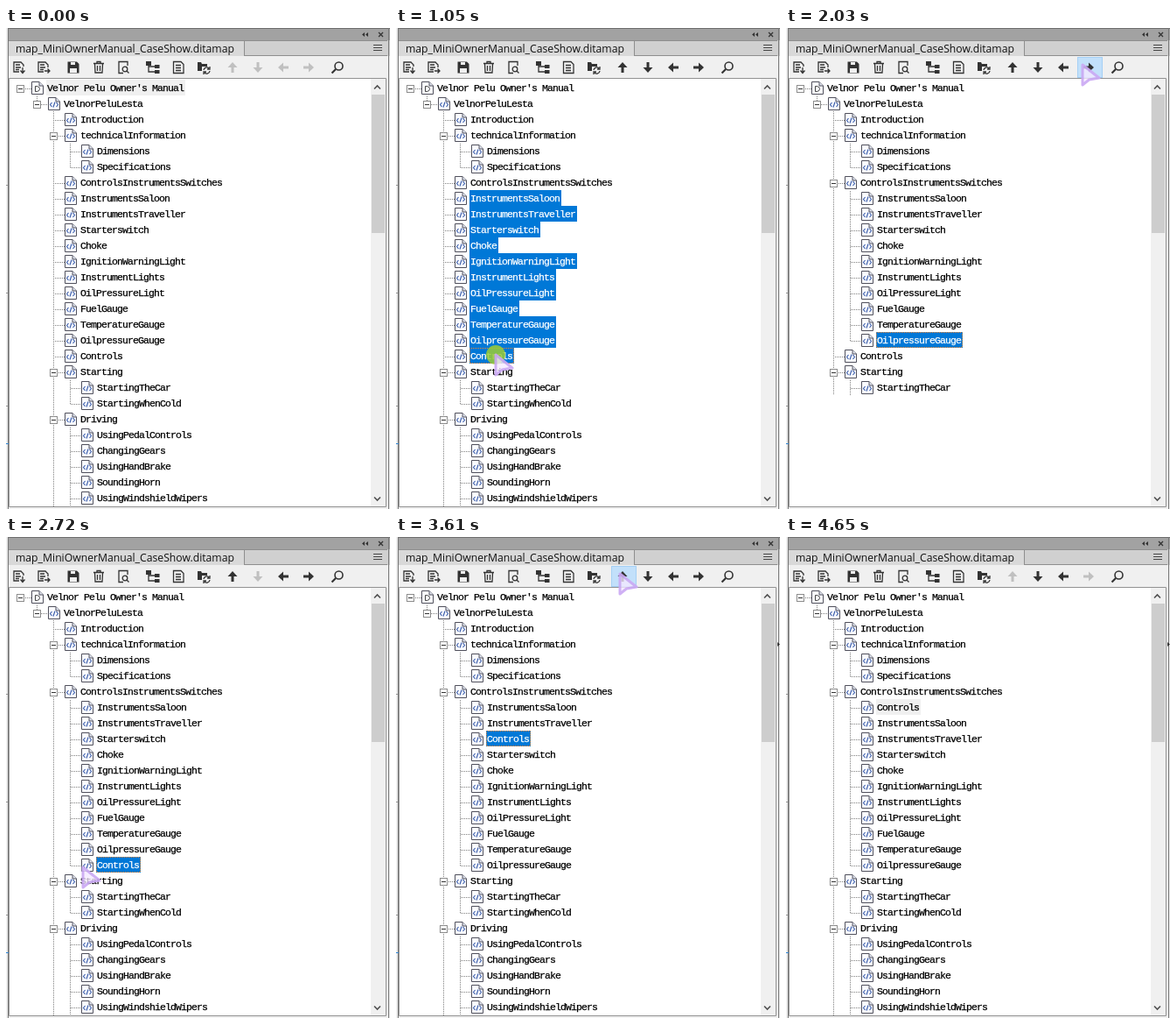
These frames come from a looping animation (439x549 px, 5.06 s). An HTML page:

```html
<!DOCTYPE html>
<html lang="en">
<head>
<meta charset="utf-8">
<title>Reordering topics in a map</title>
<style>
html, body { margin: 0; width: 100%; height: 100%; overflow: hidden; background: #fff; }
svg { display: block; }
.tree text { font: 11.5px "Liberation Mono", monospace; letter-spacing: -.9px; white-space: pre; stroke-width: .25px; }
.tab { font: 12.2px "Open Sans", "Noto Sans", sans-serif; fill: #111; }
.ico { fill: none; stroke: #333; stroke-width: 1.3; }
.ico .f { fill: #333; stroke: none; }
</style>
</head>
<body>
<svg width="439" height="549" viewBox="0 0 439 549">
  <defs>
    <clipPath id="view"><rect id="painted" x="4" y="58" width="413" height="488"/></clipPath>
    <pattern id="dots" width="2" height="2" patternUnits="userSpaceOnUse">
      <path d="M1 0H2V1H1ZM0 1H1V2H0Z" fill="#808080"/>
    </pattern>
    <g id="page">
      <path d="M.5 .5H9L13.500 5V14.500H.5Z" fill="#fbfcff" stroke="#50505c"/>
      <path d="M9 .5V5H13.500" fill="#dfe3ee" stroke="#50505c"/>
    </g>
    <g id="topic">
      <use href="#page"/>
      <path d="M4.500 6L2.500 8.500L4.500 11M9.500 6L11.500 8.500L9.500 11M8 5.500L6 11.500" fill="none" stroke="#3558a8" stroke-width="1.1"/>
    </g>
    <g id="map">
      <use href="#page"/>
      <path d="M4.500 5.500V11.500H6.500Q9.500 11 9.500 8.500T6.500 5.500Z" fill="none" stroke="#444"/>
    </g>
    <path id="arrow" d="M0 -6L5.500 0H1.500V6H-1.500V0H-5.500Z"/>
  </defs>

  <rect width="439" height="549" fill="#f0f0f0"/>
  <rect width="439" height="14" fill="#a2a2a2"/>
  <path d="M0 .5H439" stroke="#6e6e6e"/>
  <rect y="14" width="439" height="18" fill="#d0d0d0"/>
  <path d="M4 32V14.500H272.500V32Z" fill="#d9d9d9"/>
  <path d="M272.500 14V32M272 31.500H436M3 14.500H436" stroke="#8e8e8e" fill="none"/>
  <path d="M410 5L407 7.500L410 10ZM414 5L411 7.500L414 10Z" fill="#333"/>
  <path d="M426 5L431 10M431 5L426 10" stroke="#333" stroke-width="1.300"/>
  <path d="M420 19.500H430M420 22.500H430M420 25.500H430" stroke="#444"/>
  <text class="tab" x="11" y="28">map_MiniOwnerManual_CaseShow.ditamap</text>

  <g id="bar">
    <rect id="hover" y="33.500" width="28" height="23" fill="#c2e0fa" stroke="#a5d0f5"/>
    <g class="ico" transform="translate(15 45)">
      <path d="M5 -1V-3L2 -6H-6V5H0M-4 -3H1M-4 0H2M-4 2.500H0M4 0V6M1.500 3.500L4 6.500L6.500 3.500"/>
    </g>
    <g class="ico" transform="translate(43 45)">
      <path d="M5 0V-3L2 -6H-6V5H0M-4 -3H1M-4 0H2M-4 2.500H0M1 4H7M4.500 1.500L7 4L4.500 6.500"/>
    </g>
    <g class="ico" transform="translate(77 45)">
      <path class="f" d="M-6.500 -6.500H4L6.500 -4V6.500H-6.500Z"/>
      <path d="M-3 -6H2V-3H-3ZM-4 1H4V6H-4Z" style="fill:#f0f0f0;stroke:none"/>
    </g>
    <g class="ico" transform="translate(106 45)">
      <path d="M-6 -4.500H6M-2 -5V-6.500H2V-5M-4.500 -4L-4 6H4L4.500 -4M-1.500 -2V4M1.500 -2V4"/>
    </g>
    <g class="ico" transform="translate(134 45)">
      <path d="M5 -2V-6.500H-5V6.500H0M4 4L6.500 6.500"/><circle cx="2" cy="2" r="2.800"/>
    </g>
    <g class="ico" transform="translate(168 45)">
      <path class="f" d="M-8 -7H-2V-2H-8ZM2 -3H7.500V1H2ZM2 3H7.500V7H2Z"/>
      <path d="M-5 -2V5H2M-5 -1H2"/>
    </g>
    <g class="ico" transform="translate(197 45)">
      <path d="M-5.500 -6.500H3L6 -3.500V6.500H-5.500ZM-3 -2.500H3M-3 .5H3M-3 3.500H3"/>
    </g>
    <g class="ico" transform="translate(226 45)">
      <path class="f" d="M-7 -6H-3L-2 -4H4V-1H-2V4H-7Z"/>
      <path d="M0 3A3.500 3.500 0 0 1 6 1M7 4A3.500 3.500 0 0 1 1 6M7 -1V2H4M0 8V5H3"/>
    </g>
    <g id="arrows"></g>
    <g class="ico" transform="translate(379 45)">
      <circle cx="1.500" cy="-1.500" r="4.500" style="stroke-width:1.600"/>
      <path d="M-2 2L-6.500 6.500" style="stroke-width:2.200"/>
    </g>
  </g>

  <rect x="4" y="58" width="430" height="488" fill="#fff"/>
  <g class="tree" id="tree" clip-path="url(#view)"></g>

  <rect x="417" y="58" width="17" height="488" fill="#f0f0f0"/>
  <rect x="418" y="76" width="15" height="158" fill="#cdcdcd"/>
  <path d="M421 69.500L424.500 66L428 69.500M421 535.500L424.500 539L428 535.500" fill="none" stroke="#505050" stroke-width="1.600"/>
  <path d="M3.500 57.500H434.500V546.500H3.500Z" fill="none" stroke="#929292"/>
  <rect width="2" height="549" fill="#ececec"/>
  <path d="M2.500 0V549M437.500 0V549" stroke="#777"/>
  <path d="M0 179.500H2M0 302.500H2M0 431.500H2" stroke="#999"/>
  <path d="M0 474.500H3" stroke="#2f86d6"/>
  <path id="edge" d="M436 120L439 122.500L436 125Z" fill="#333"/>

  <circle id="click" r="11" fill="#9ccb35" opacity=".85"/>
  <path id="cursor" d="M0 0L0 23L7.500 17L19 15Z" fill="#f3e9ff" fill-opacity=".85" stroke="#cbaaf4" stroke-width="3" stroke-linejoin="round" opacity=".92"/>
</svg>
<script>
const LOOP = 5060, ROW = 18, TOP = 68, STEP = 19;
const VIEW_TOP = 58, VIEW_HEIGHT = 488;
const ROOT = "Velnor Pelu Owner's Manual";
const MOVED = ["InstrumentsSaloon", "InstrumentsTraveller", "Starterswitch", "Choke",
  "IgnitionWarningLight", "InstrumentLights", "OilPressureLight", "FuelGauge",
  "TemperatureGauge", "OilpressureGauge", "Controls"];
const HEAD = [[0, ROOT], [1, "VelnorPeluLesta"], [2, "Introduction"], [2, "technicalInformation"],
  [3, "Dimensions"], [3, "Specifications"], [2, "ControlsInstrumentsSwitches"]];
const TAIL = [[2, "Starting"], [3, "StartingTheCar"], [3, "StartingWhenCold"], [2, "Driving"],
  [3, "UsingPedalControls"], [3, "ChangingGears"], [3, "UsingHandBrake"], [3, "SoundingHorn"],
  [3, "UsingWindshieldWipers"], [3, "UsingLights"], [2, "Maintenance"]];

// time, x, y of the pointer tip
const PATH = [[50, 445, 330], [420, 163, 194], [580, 163, 194], [760, 114, 373], [1290, 114, 373],
  [1520, 339, 42], [2250, 339, 42], [2480, 88, 377], [2940, 88, 377], [3140, 256, 42],
  [4140, 256, 42], [4290, 445, 130]];
const CLICKS = [[450, 520], [1050, 1110], [1680, 1760], [2630, 2720]];
const INDENTS = [[1820, 3], [1890, 6], [1960, 8], [2030, 10], [2110, 11]];
const UP_START = 3218, UP_GAP = 56, UPS = 10;
const ARROWS = [[259, 0], [288, 180], [317, 270], [346, 90]];

const $ = id => document.getElementById(id);
const ease = p => p * p * (3 - 2 * p);

$("arrows").innerHTML = ARROWS.map(([x, r]) =>
  `<use href="#arrow" transform="translate(${x} 45) rotate(${r})"/>`).join("");

function stateAt(t) {
  const s = { nested: 0, order: MOVED, selected: [], gray: "", on: "udlr", height: VIEW_HEIGHT };
  if (t < 450) { s.gray = ROOT; s.on = ""; }
  else if (t < 1050) s.selected = [MOVED[0]];
  else if (t < 1820) s.selected = MOVED;
  else if (t < 2190) {
    s.nested = INDENTS.filter(k => t >= k[0]).pop()[1];
    s.selected = [MOVED[s.nested - 1]];
    s.height = TOP + ROW * 19.5 - VIEW_TOP; // repaint stops part way down
  } else {
    s.nested = MOVED.length;
    s.selected = t < 2630 ? MOVED : ["Controls"];
    const ups = Math.max(0, Math.min(UPS, Math.floor((t - UP_START) / UP_GAP) + 1));
    s.order = MOVED.slice(0, -1);
    s.order.splice(UPS - ups, 0, "Controls");
    s.on = t < 2630 ? "l" : ups === 0 ? "ulr" : ups === UPS ? "dl" : "udlr";
    if (t >= 4650) { s.selected = []; s.gray = "Controls"; }
  }
  return s;
}

function treeMarkup(s) {
  const items = s.order.map((name, i) => [i < s.nested ? 3 : 2, name]);
  const rows = [...HEAD, ...items, ...TAIL];
  const focus = s.selected[s.selected.length - 1];
  let lines = "", nodes = "";
  rows.forEach(([level, name], i) => {
    const y = TOP + ROW * i, x = 16 + STEP * level, tx = x + 31;
    let last = -1;
    for (let j = i + 1; j < rows.length && rows[j][0] > level; j++)
      if (rows[j][0] === level + 1) last = j;
    lines += `M${x} ${y + 1.5}H${x + 13}`;
    if (last > 0) {
      lines += `M${x + STEP + .5} ${y + 9}V${TOP + ROW * last + 1}`;
      nodes += `<rect x="${x - 3.5}" y="${y - 2.5}" width="8" height="8" fill="#fff" stroke="#8c8c8c"/>
        <path d="M${x - 2} ${y + 1.5}H${x + 3}" stroke="#333"/>`;
    }
    nodes += `<use href="#${level ? "topic" : "map"}" x="${x + 13}" y="${y - 7}"/>`;
    const picked = s.selected.includes(name), w = name.length * 6 + 3;
    const ink = picked ? "#fff" : "#000";
    if (picked || s.gray === name)
      nodes += `<rect x="${tx - 1}" y="${y - 9}" width="${w}" height="18" fill="${picked ? "#0078d7" : "#f0f0f0"}"/>`;
    if (picked && name === focus)
      nodes += `<rect x="${tx - .5}" y="${y - 8.5}" width="${w - 1}" height="17" fill="none" stroke="#ff8728" stroke-dasharray="1 1" stroke-dashoffset=".5"/>`;
    nodes += `<text x="${tx}" y="${y + 4}" fill="${ink}" stroke="${ink}">${name}</text>`;
  });
  return `<path d="${lines}" fill="none" stroke="url(#dots)" shape-rendering="crispEdges"/>${nodes}`;
}

function pointerAt(t) {
  const i = PATH.findIndex(k => k[0] > t);
  if (i < 1) return null;
  const [t0, x0, y0] = PATH[i - 1], [t1, x1, y1] = PATH[i];
  const p = ease((t - t0) / (t1 - t0));
  return [x0 + (x1 - x0) * p, y0 + (y1 - y0) * p];
}

function pressedAt(t) {
  if (CLICKS.some(([a, b]) => t >= a && t < b)) return true;
  const u = t - UP_START + UP_GAP;
  return u >= 0 && u < UP_GAP * UPS && u % UP_GAP >= 40;
}

const show = (el, on) => el.setAttribute("visibility", on ? "visible" : "hidden");
let lastKey = "";

function render(t) {
  const s = stateAt(t), key = JSON.stringify(s);
  if (key !== lastKey) {
    lastKey = key;
    $("tree").innerHTML = treeMarkup(s);
    $("painted").setAttribute("height", s.height);
    [...$("arrows").children].forEach((a, i) =>
      a.setAttribute("fill", s.on.includes("udlr"[i]) ? "#333" : "#c0c0c0"));
  }
  const tip = pointerAt(t);
  show($("cursor"), tip);
  show($("click"), tip && pressedAt(t));
  show($("edge"), t >= 2940);
  let over = -1;
  if (tip) {
    const at = `translate(${tip[0].toFixed(2)} ${tip[1].toFixed(2)})`;
    $("cursor").setAttribute("transform", at);
    $("click").setAttribute("transform", at);
    if (tip[1] > 33 && tip[1] < 57)
      over = ARROWS.findIndex(([x], i) => Math.abs(tip[0] - x) < 14 && s.on.includes("udlr"[i]));
  }
  show($("hover"), over >= 0);
  if (over >= 0) $("hover").setAttribute("x", ARROWS[over][0] - 12.5);
}

const start = performance.now();
function frame() {
  render((performance.now() - start) % LOOP);
  requestAnimationFrame(frame);
}
frame();
</script>
</body>
</html>
```
